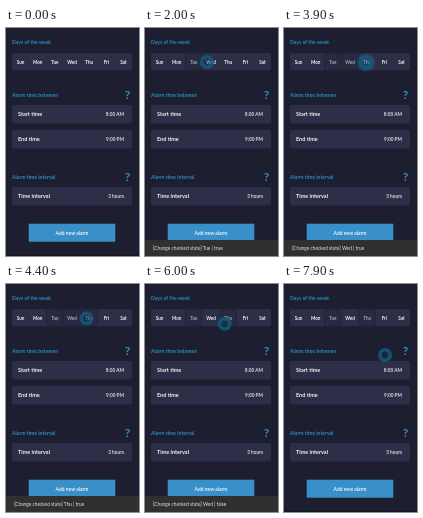
Write an HTML page that moves like this. It is 133 by 228 pixels and loops after 8 s.

```html
<!DOCTYPE html>
<html lang="en">
<head>
<meta charset="utf-8">
<title>Alarm settings</title>
<style>
  html, body { margin: 0; width: 100%; height: 100%; overflow: hidden; background: #1d1e2f; }
  svg { display: block; width: 100vw; height: 100vh; }
  text { font: bold 5.3px Lato, sans-serif; fill: #f0f1f6; }
  .title { fill: #2b8abd; font-size: 5.1px; }
  .help { fill: #2b94cc; font-size: 12px; text-anchor: middle; }
  .day { font-size: 4.6px; text-anchor: middle; }
  .value { font-size: 4.75px; text-anchor: end; fill: #d9dbe4; }
  .label { font-size: 5.5px; }
  .button { font-size: 4.95px; text-anchor: middle; }
  .toast { font-size: 4.8px; font-weight: normal; fill: #e6e6e6; }
  .checked rect { fill: #282a41; stroke: #202235; stroke-width: 0.8; }
  .checked text { fill: #a3a7b7; }
</style>
</head>
<body>
<svg id="stage" viewBox="0 0 133 228"></svg>
<script>
const stage = document.getElementById('stage');

function add(name, attrs, parent = stage, content = '') {
  const node = document.createElementNS('http://www.w3.org/2000/svg', name);
  for (const key in attrs) node.setAttribute(key, attrs[key]);
  node.textContent = content;
  return parent.appendChild(node);
}
const box = (x, y, width, height, fill, rx = 0, parent) =>
  add('rect', { x, y, width, height, fill, rx }, parent);
const write = (x, y, style, content, parent) =>
  add('text', { x, y, class: style }, parent, content);

function section(y, title) {
  write(6, y, 'title', title);
  write(121.5, y + 2.6, 'help', '?');
}
function row(y, label, value) {
  box(6, y, 120, 18.5, '#2d2f49', 2);
  write(12, y + 11.2, 'label', label);
  write(118, y + 11.1, 'value', value);
}

write(6, 16.2, 'title', 'Days of the week');
box(6, 25.2, 120, 17, '#2d2f49', 2);
const dayWidth = 120 / 7;
const days = ['Sun', 'Mon', 'Tue', 'Wed', 'Thu', 'Fri', 'Sat'].map((name, i) => {
  const group = add('g', {});
  box(6.3 + i * dayWidth, 25.5, dayWidth - 0.6, 16.4, '#2d2f49', 2, group);
  write(6 + (i + 0.5) * dayWidth, 35.6, 'day', name, group);
  return group;
});
section(68.8, 'Alarm time between');
row(77, 'Start time', '8:00 AM');
row(102, 'End time', '9:00 PM');
section(150.8, 'Alarm time interval');
row(159, 'Time interval', '3 hours');
box(22.7, 195.7, 86.6, 18, '#398fc7');
write(66, 206.6, 'button', 'Add new alarm');
box(0, 226.5, 133, 1.5, '#161521');

const toast = add('g', {});
box(0, 212, 133, 16, '#303032', 0, toast);
const message = write(8, 222.1, 'toast', '', toast);

const pointer = add('g', {});
const ripple = add('circle', { r: 9, fill: '#2488b5' }, pointer);
add('circle', { r: 5.2, fill: '#123b56', 'fill-opacity': 0.35,
  stroke: '#125b80', 'stroke-width': 3.6, 'stroke-opacity': 0.85 }, pointer);

// Pointer stops: time, x, y
const path = [
  [100, 108, 20], [900, 49, 34], [1500, 49, 34], [2200, 65, 34], [2600, 66, 34],
  [3000, 69.5, 33.5], [3400, 79, 34.5], [3900, 82, 34.5], [4250, 82, 34.5],
  [4900, 70.5, 34], [5000, 69.5, 33.5], [5300, 69.5, 33.5], [5400, 68, 34], [5750, 68, 34],
  [6500, 112.7, 56.3], [7100, 122, 67], [7700, 122, 67], [7900, 101, 71], [8000, 98, 72]
];
// Day toggles: time, day index, new state, time the toast leaves
const toggles = [
  [1300, 2, true, 2650], [3200, 3, true, 4200],
  [4200, 4, true, 5700], [5700, 3, false, 7750]
];
const clamp = v => Math.max(0, Math.min(1, v));
const ease = v => v * v * (3 - 2 * v);

function pointerAt(t) {
  const next = Math.max(1, path.findIndex(stop => stop[0] > t));
  const [t0, x0, y0] = path[next - 1];
  const [t1, x1, y1] = path[next];
  const k = ease(clamp((t - t0) / (t1 - t0)));
  return [x0 + (x1 - x0) * k, y0 + (y1 - y0) * k];
}

function render(t) {
  const checked = {};
  let current = null, press = 0;
  for (const toggle of toggles) {
    const [at, day, state] = toggle;
    press = Math.max(press, clamp(1 - Math.abs(t - at + 250) / 400));
    if (t < at) continue;
    checked[day] = state;
    current = toggle;
  }
  days.forEach((day, i) => day.classList.toggle('checked', !!checked[i]));

  let shown = 0;
  if (current) {
    const [at, day, state, end] = current;
    const name = days[day].textContent;
    message.textContent = `[Change checked state] ${name} | ${state}`;
    shown = clamp((t - at) / 150) * clamp((end + 100 - t) / 100);
  }
  toast.setAttribute('opacity', shown);

  const [x, y] = pointerAt(t);
  pointer.setAttribute('transform', `translate(${x} ${y})`);
  pointer.setAttribute('opacity', clamp((t - 50) / 100));
  ripple.setAttribute('opacity', press * 0.3);
}

function tick(now) {
  render(now % 8000);
  requestAnimationFrame(tick);
}
render(0);
requestAnimationFrame(tick);
</script>
</body>
</html>
```
